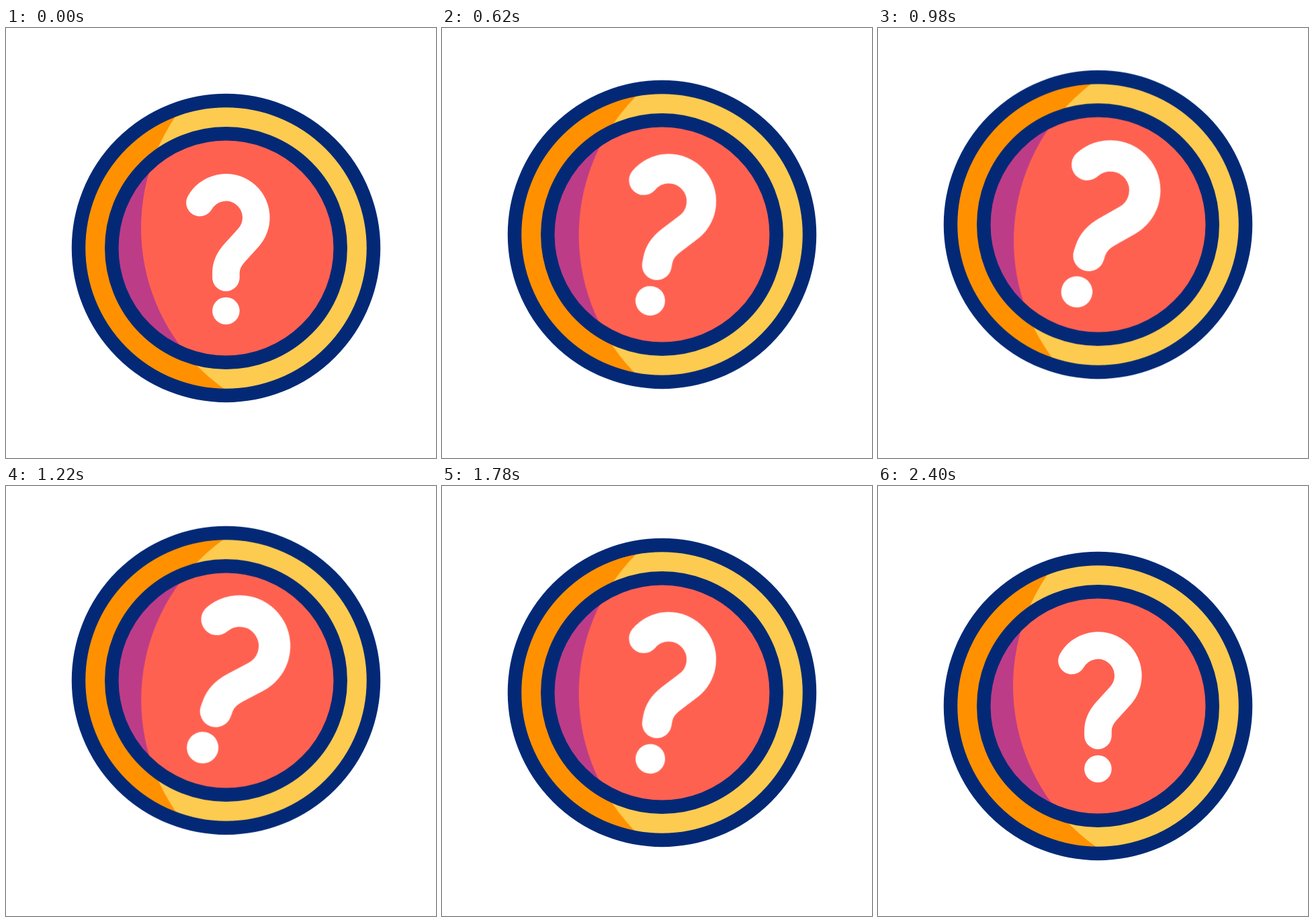
Write an HTML page that moves like this. It is 640 px wide and 640 px high and loops after 2420 ms.

```html
<!DOCTYPE html>
<html lang="en">
<head>
<meta charset="utf-8">
<title>Question coin</title>
<style>
  html, body { margin: 0; width: 100%; height: 100%; overflow: hidden; background: #fff; }
  svg { display: block; width: 100%; height: 100%; }

  .coin, .face, .mark {
    animation: 2420ms cubic-bezier(.333, 0, .667, 1) infinite;
  }
  .coin { animation-name: rise; }
  .face { animation-name: tilt; transform-origin: 327.5px 327.5px; }
  .mark { animation-name: swell; transform-origin: 330.5px 334px; }

  /* 1200 ms out, 1200 ms back, 20 ms rest */
  @keyframes rise {
    0%, 99.174%, 100% { transform: translateY(0); }
    49.587% { transform: translateY(-38.2px); }
  }
  @keyframes tilt {
    0%, 99.174%, 100% { transform: rotate(0deg); }
    49.587% { transform: rotate(20deg); }
  }
  @keyframes swell {
    0%, 99.174%, 100% { transform: rotate(0deg) scale(1); }
    49.587% { transform: rotate(20deg) scale(1.16); }
  }
</style>
</head>
<body>
<svg viewBox="0 0 640 640">
  <defs>
    <clipPath id="rim"><circle cx="327.5" cy="327.5" r="219.5"/></clipPath>
    <clipPath id="disc"><circle cx="327.5" cy="327.5" r="170.2"/></clipPath>
  </defs>
  <g class="coin">
    <g class="face">
      <circle cx="327.5" cy="327.5" r="219.5" fill="#ff9100"/>
      <g clip-path="url(#rim)"><circle cx="495" cy="297.5" r="294" fill="#fdcb50"/></g>
      <circle cx="327.5" cy="327.5" r="170.2" fill="#bd3c87"/>
      <g clip-path="url(#disc)"><circle cx="495" cy="297.5" r="294" fill="#ff6151"/></g>
    </g>
    <g fill="none" stroke="#032976" stroke-width="20.5">
      <circle cx="327.5" cy="327.5" r="219.5"/>
      <circle cx="327.5" cy="327.5" r="170.2"/>
    </g>
    <g class="mark">
      <path d="M288.5 260A44.8 44.8 0 1 1 360.1 312.8L341 333.8C332 343.5 327.4 353 327.4 364V371.5"
            fill="none" stroke="#fff" stroke-width="40.6" stroke-linecap="round" stroke-linejoin="round"/>
      <circle cx="327.4" cy="421" r="20.3" fill="#fff"/>
    </g>
  </g>
</svg>
</body>
</html>
```
